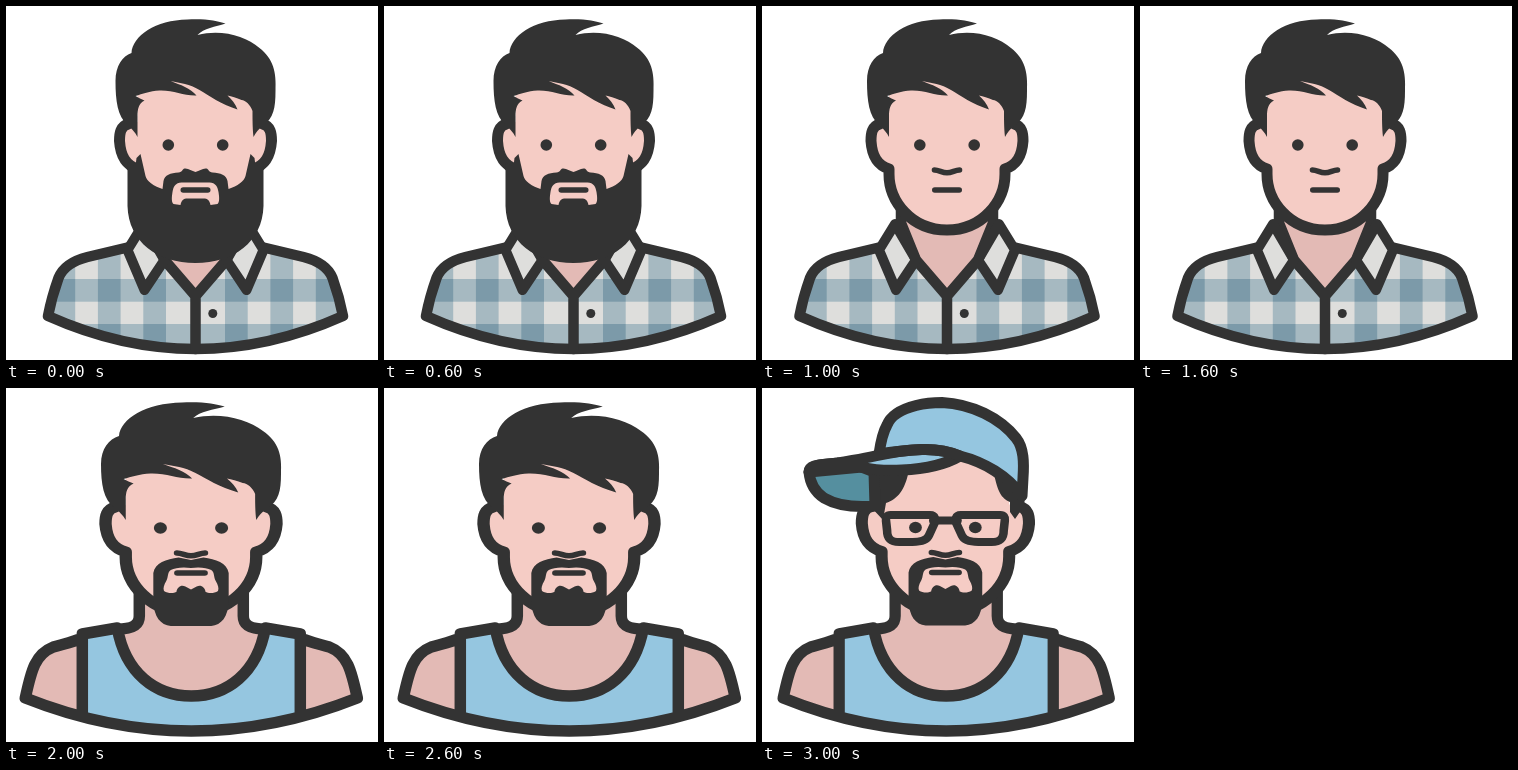
Animation, 372 px wide and 354 px high, one loop 4000 ms. Source, as an HTML page with a canvas:

```html
<!DOCTYPE html>
<html lang="en">
<head>
<meta charset="utf-8">
<title>Four portraits</title>
<style>
  html, body { margin: 0; width: 100%; height: 100%; overflow: hidden; background: #fff; }
  canvas { display: block; }
</style>
</head>
<body>
<canvas id="stage" width="372" height="354"></canvas>
<script>
const ctx = document.getElementById('stage').getContext('2d');
const INK = '#333333', FACE = '#f5ccc5', NECK = '#e3bab5';
const CLOTH = '#dededc', SKY = '#95c6e0', TEAL = '#558f9f';

const path = d => new Path2D(d);

// Joins a left half with its mirror image around x = 0.
function twin(d) {
  const p = path(d);
  p.addPath(path(d), new DOMMatrix([-1, 0, 0, 1, 0, 0]));
  return p;
}

const shape = {
  head: twin('M0 70L-58 80V116L-67 118C-75 120 -76 127 -76 135C-75 150 -70 159 -58 163V168C-58 195 -36 224 0 224Z'),
  headLine: twin('M-67 118C-75 120 -76 127 -76 135C-75 150 -70 159 -58 163V168C-58 195 -36 224 0 224'),
  hair: path('M-64 47C-63 30 -40 14 -8 13.5C10 12.5 22 15 30 17.5C20 21 8 22 2 29C26 23 50 30 64 42C78 53 81 66 80 85' +
    'C80 102 78 112 68 119C63 123 60 127 58 131C57 122 57 112 57 105C55 99 50 94 46 94C41 92 36 90 32 89.5' +
    'C36 93 40 98 42 103.5C25 98 14 90 4 84C-6 78 -15 77 -25 75C-15 79 -5 82 1 89.5C-12 90 -22 84 -36 84.5' +
    'C-46 85 -53 88 -60 90C-57 92 -54 93 -51 94.5C-57 97 -58 104 -58 110L-58 131C-60 127 -64 122 -68 119' +
    'C-78 110 -80 95 -80 75C-80 60 -73 50 -64 47Z'),
  nose: path('M-12.5 164C-8 164 -5 166.8 0 166.8C5 166.8 8 164 12.5 164'),
  mouth: path('M-12.2 184H12.2'),
  beard: twin('M-68 156V200C-67 236 -38 257 0 257V166C-4 165 -7 162 -11 162.5C-13 163 -13 166 -17 166.5' +
    'C-25 167 -31 169 -32 175L-33 183C-42 180 -49 175 -50 170L-55 148L-59 152L-60 160Z'),
  beardGap: twin('M0 176.5H-14C-20 177 -22 180 -23 186C-24 192 -24 196 -22 198L-15 199C-14 194 -12 192.5 -8 192.5H0Z'),
  goatee: twin('M0 171L-11 168.5C-22 170 -32 174 -33.5 184V212C-33 228 -27 236 -18 237H0Z'),
  goateeGap: twin('M0 179C-8 177.5 -14 179 -18 181C-21 183 -20 188 -22 192C-24 196 -25 199 -24 202' +
    'C-20 205 -15 204 -13 203C-12 198 -9 195.5 -5 197.5L0 200.5Z'),
  shirt: twin('M0 343Q-73.7 343 -147.5 310C-145 297 -142 286 -137 272C-133 262 -124 255 -108 251L-66 241L-31 254L0 290Z'),
  shirtLine: twin('M0 343Q-73.7 343 -147.5 310C-145 297 -142 286 -137 272C-133 262 -124 255 -108 251L-66 241'),
  throat: twin('M0 195H-46V217L-31 254L0 290Z'),
  throatLine: twin('M-46 200V217L-31 254L0 290V343'),
  collar: twin('M-68 244L-52 218L-31 254L-51 284Z'),
  torso: twin('M0 343Q-83 343 -166 310C-160 282 -156 266 -138 259C-128 256 -118 254 -109 250L-75 242C-60 241 -52 238 -52 228V200H0Z'),
  tank: twin('M-109 246L-74 240C-66 285 -36 308 0 308V343Q-54.5 343 -109 328.8Z'),
  tankLine: twin('M0 343Q-83 343 -166 310C-160 282 -156 266 -138 259C-128 256 -118 254 -109 250' +
    'M-109 328V246L-74 240C-66 285 -36 308 0 308M-74 241C-60 241 -52 238 -52 228V200'),
  lens: twin('M-50 126.5H-14C-9 126.5 -9 131 -10 135L-15 147C-17 152 -22 153.5 -30 153.5H-42C-50 153.5 -53 150 -53 142L-54 132Q-54.5 126.5 -50 126.5Z'),
  bridge: path('M-11 132H11'),
  locks: path('M108 82H147C143 102 136 111 124 115L121 132L108 118Z' +
    'M232 86L264 100L262 118L253 131L248 124V114C239 110 236 104 232 86Z'),
  crown: path('M117 66C119 52 121 44 125 37C129 27 140 21 154 17.5C164 15 172 14.5 180 14.5C210 16 238 30 254 50' +
    'C262 60 262 75 261 90L260 108C246 88 222 74 198 68C186 63 175 61 160 61.5C146 62 130 64 117 66Z'),
  brim: path('M47 84C47 76 60 77 76 75C92 72 100 71 113 68C130 64 146 62 160 61.5C175 61 186 63 198 68' +
    'C186 75 165 81 140 82C125 83 112 82 100 79Z'),
  under: path('M47 84C48 76 66 76 76 75C90 75 100 79 112 84L113 118C90 120 74 117 62 110C53 104 48 95 47 84Z')
};

function fill(p, color) {
  ctx.fillStyle = color;
  ctx.fill(p);
}

function line(p, width, color = INK) {
  ctx.strokeStyle = color;
  ctx.lineWidth = width;
  ctx.stroke(p);
}

function dot(x, y, r) {
  ctx.fillStyle = INK;
  ctx.beginPath();
  ctx.arc(x, y, r, 0, Math.PI * 2);
  ctx.fill();
}

function at(x, y, sx, draw) {
  ctx.save();
  ctx.translate(x, y);
  ctx.scale(sx, 1);
  draw();
  ctx.restore();
}

function gingham() {
  const band = 22.7;
  ctx.save();
  ctx.clip(shape.shirt);
  ctx.fillStyle = CLOTH;
  ctx.fillRect(-160, 230, 320, 120);
  ctx.globalCompositeOperation = 'multiply';
  ctx.fillStyle = '#bfd5e0';
  for (let x = 29.5; x < 150; x += band * 2) {
    ctx.fillRect(x, 230, band, 120);
    ctx.fillRect(-x - band, 230, band, 120);
  }
  for (const y of [273, 318]) ctx.fillRect(-160, y, 320, band);
  ctx.restore();
}

function shirt() {
  gingham();
  fill(shape.throat, NECK);
  line(shape.shirtLine, 10.5);
  fill(shape.collar, CLOTH);
  line(shape.throatLine, 10.5);
  line(shape.collar, 10);
  dot(17.3, 307.5, 4.5);
}

function tank() {
  fill(shape.torso, NECK);
  fill(shape.tank, SKY);
  line(shape.tankLine, 11.5);
}

function face() {
  fill(shape.head, FACE);
  line(shape.headLine, 11);
  dot(-27.2, 139, 5.8);
  dot(27.2, 139, 5.8);
}

function mouth() {
  line(shape.mouth, 5.6);
}

function nose() {
  line(shape.nose, 5.6);
}

function goatee() {
  fill(shape.goatee, INK);
  fill(shape.goateeGap, FACE);
  nose();
  mouth();
}

function glasses() {
  line(shape.lens, 7.8);
  line(shape.bridge, 7.8);
}

function cap() {
  fill(shape.locks, INK);
  fill(shape.under, TEAL);
  fill(shape.brim, SKY);
  fill(shape.crown, SKY);
  for (const part of ['under', 'brim', 'crown']) line(shape[part], 11);
}

const scenes = [
  () => at(189.5, 0, 1, () => {
    shirt();
    face();
    fill(shape.beard, INK);
    fill(shape.beardGap, FACE);
    mouth();
    fill(shape.hair, INK);
  }),
  () => at(185, 0, 1, () => {
    shirt();
    face();
    nose();
    mouth();
    fill(shape.hair, INK);
  }),
  () => {
    at(185.3, 0, 1, tank);
    at(185, 1, 1.125, () => {
      face();
      goatee();
      fill(shape.hair, INK);
    });
  },
  () => {
    at(184.2, 0, 0.982, tank);
    at(183.4, 0.5, 1.1, () => {
      face();
      goatee();
      glasses();
    });
    cap();
  }
];

ctx.lineCap = ctx.lineJoin = 'round';
let shown = -1;

function tick() {
  const index = Math.floor(performance.now() / 1000) % scenes.length;
  if (index !== shown) {
    shown = index;
    ctx.fillStyle = '#fff';
    ctx.fillRect(0, 0, 372, 354);
    scenes[index]();
  }
  requestAnimationFrame(tick);
}
tick();
</script>
</body>
</html>
```
